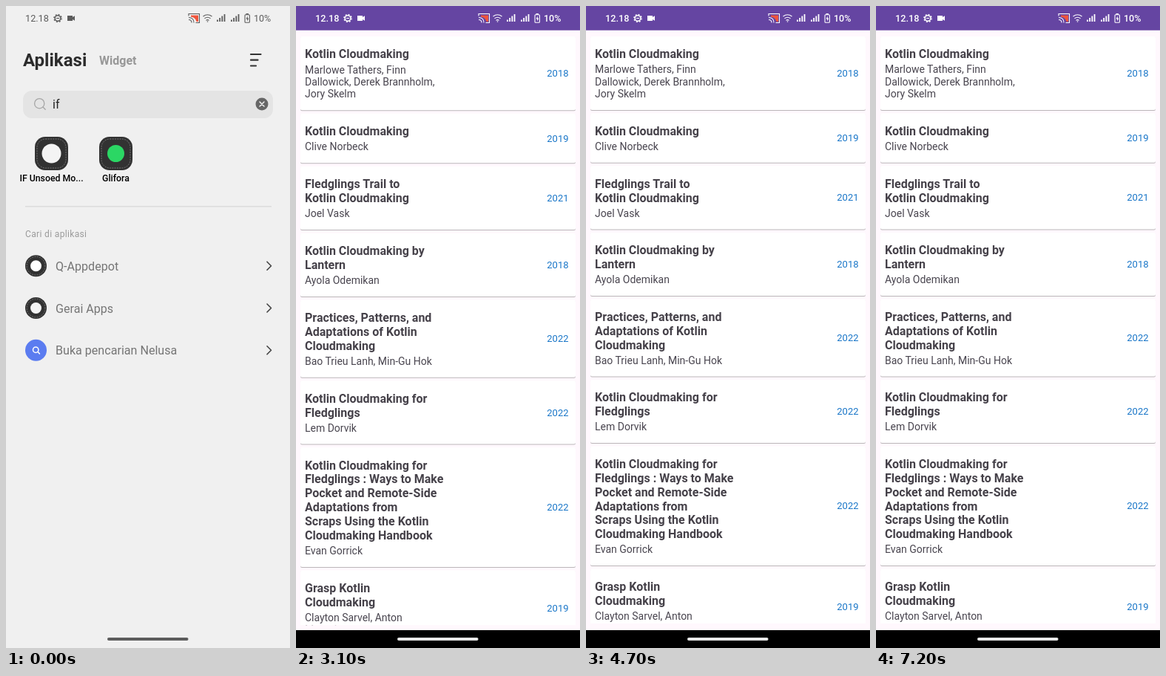
Animation, 384 px wide and 864 px high, one loop 7300 ms. Source, as an HTML page:

```html
<!DOCTYPE html>
<html lang="id">
<head>
<meta charset="utf-8">
<title>Book list app</title>
<style>
  html, body { margin: 0; width: 100%; height: 100%; overflow: hidden; background: #f0f0f0; }
  svg { display: block; width: 100%; height: 100%; }
  text { font-family: Roboto, sans-serif; }
  .label { font-size: 12.3px; font-weight: 500; text-anchor: middle; }
  .row { font-size: 16.1px; fill: #757575; }
  .title { font-size: 16px; font-weight: 700; fill: #454149; }
  .author { font-size: 14px; fill: #49454f; }
  .year { font-size: 13px; fill: #1976c8; text-anchor: end; }
  .card { fill: #fff; filter: drop-shadow(0 1px .6px #0004); }
  .line { fill: none; stroke-linecap: round; stroke-linejoin: round; }
  .dash { fill: none; stroke: #8a8a8a; stroke-width: .8; stroke-dasharray: 1.8 1.5; }
</style>
</head>
<body>
<svg viewBox="0 0 384 864">
  <defs>
    <clipPath id="windowClip"><rect id="windowRect"/></clipPath>
    <clipPath id="listClip"><rect y="40" width="384" height="791"/></clipPath>
  </defs>

  <g id="launcher">
    <rect width="384" height="864" fill="#f0f0f0"/>
    <text x="23" y="81" font-size="24" font-weight="700" fill="#2c2c2c">Aplikasi</text>
    <text x="126" y="78.5" font-size="16" font-weight="700" fill="#979797">Widget</text>
    <path class="line" d="M331 65h13.5M331 72.7h9.5M331 80.5h7" stroke="#333" stroke-width="2.2"/>
    <rect x="23" y="114" width="338" height="37" rx="12" fill="#e4e4e4"/>
    <g class="line" stroke="#a6a6a6" stroke-width="1.3"><circle cx="45.2" cy="131.2" r="6.6"/><path d="M50 136l3.2 3.2"/></g>
    <text x="63" y="138" font-size="16" fill="#222">if</text>
    <rect id="caret" x="74" y="123.5" width="1.6" height="19" fill="#456fff"/>
    <circle cx="346" cy="132" r="8.5" fill="#666"/>
    <path class="line" d="M343 129l6 6m0-6l-6 6" stroke="#f0f0f0" stroke-width="1.5"/>
    <g id="apps"></g>
    <path d="M26 269.8H359" stroke="#dcdcdc" stroke-width="1.5"/>
    <text x="26" y="310.5" font-size="12" letter-spacing=".35" fill="#9a9a9a">Cari di aplikasi</text>
    <g id="rows"></g>
  </g>

  <g id="window" clip-path="url(#windowClip)">
    <g id="screen">
      <rect width="384" height="864" fill="#fff8fd"/>
      <rect width="384" height="32.7" fill="#6545a2"/>
      <g id="stretch" clip-path="url(#listClip)"><g id="list"></g></g>
      <rect y="840" width="384" height="24"/>
    </g>
  </g>

  <g id="status" fill="currentColor">
    <text x="26" y="21.3" font-size="12.7">12.18</text>
    <g fill="none" stroke="currentColor">
      <circle cx="70" cy="16.5" r="3.8" stroke-width="1.5"/>
      <circle cx="70" cy="16.5" r="5.1" stroke-width="1.4" stroke-dasharray="2 2"/>
      <path d="M68 16.5h4" stroke-width="1.2"/>
    </g>
    <path d="M83 13h7v2l3-1.7v6.4l-3-1.7v2h-7z"/>
    <path d="M250 12.5h10v8.5h-2.500q-1.500-6-7.500-6.500z" fill="#f0553c"/>
    <g fill="none" stroke="currentColor" stroke-width="1.1">
      <path d="M247 13.5v-3h14.5v12h-5M247 15.5q7 0 7 7M247 18.5q4 0 4 4"/>
      <path d="M266.5 14q6-4.500 12 0M268.5 16.8q4-3 8 0M270.5 19.4q2-1.500 4 0"/>
      <rect x="323" y="11.8" width="6.4" height="10.4" rx="1"/>
    </g>
    <circle cx="272.5" cy="21" r=".8"/>
    <path d="M324.5 10h3.4v1.5h-3.4zM326.7 13.5l-2.2 4h1.6v3l2.2-4h-1.6z"/>
    <g id="signals"></g>
    <text x="335" y="21.3" font-size="12.5">10%</text>
  </g>
  <rect id="pill" x="137" y="850" width="109.5" height="4" rx="2"/>
</svg>

<script>
const LOOP = 7300, STEP = 100, MAX_SCROLL = 173;
const $ = id => document.getElementById(id);
const text = (cls, x, y, s) => `<text class="${cls}" x="${x}" y="${y}">${s}</text>`;

const books = [
  ["Kotlin Cloudmaking", "Marlowe Tathers, Finn|Dallowick, Derek Brannholm,|Jory Skelm", 2018],
  ["Kotlin Cloudmaking", "Clive Norbeck", 2019],
  ["Fledglings Trail to|Kotlin Cloudmaking", "Joel Vask", 2021],
  ["Kotlin Cloudmaking by|Lantern", "Ayola Odemikan", 2018],
  ["Practices, Patterns, and|Adaptations of Kotlin|Cloudmaking", "Bao Trieu Lanh, Min-Gu Hok", 2022],
  ["Kotlin Cloudmaking for|Fledglings", "Lem Dorvik", 2022],
  ["Kotlin Cloudmaking for|Fledglings : Ways to Make|Pocket and Remote-Side|Adaptations from|Scraps Using the Kotlin|Cloudmaking Handbook", "Evan Gorrick", 2022],
  ["Grasp Kotlin|Cloudmaking", "Clayton Sarvel, Anton|Mocariu", 2019],
  ["Kotlin Sparks", "Samil Rahmoud", 2019],
  ["Unfolding Kotlin", "Kurt Osel", 2019]
];

function buildList() {
  const TITLE_LINE = 18.85, AUTHOR_LINE = 16.4;
  let top = 41, out = "";
  for (const [title, author, year] of books) {
    const titles = title.split("|"), authors = author.split("|");
    const height = 31 + titles.length * TITLE_LINE + authors.length * AUTHOR_LINE;
    const baseline = top + 29.4;
    const authorBase = baseline + (titles.length - 1) * TITLE_LINE + 20;
    out += `<rect class="card" x="6" y="${top}" width="372" height="${height}" rx="2"/>`;
    titles.forEach((s, i) => out += text("title", 12, baseline + i * TITLE_LINE, s));
    authors.forEach((s, i) => out += text("author", 12, authorBase + i * AUTHOR_LINE, s));
    out += text("year", 368.5, top + height / 2 + 4.6, year);
    top += height + 4.5;
  }
  $("list").innerHTML = out;
}

function buildLauncher() {
  $("apps").innerHTML = [["IF Unsoed Mo...", 61.5, "#f4f4f4", 13], ["Glifora", 148.5, "#2bd764", 11.5]]
    .map(([name, x, color, r]) =>
      `<rect x="${x - 22.5}" y="176" width="45" height="45" rx="14" fill="#323232"/>
       <rect class="dash" x="${x - 19.5}" y="179" width="39" height="39" rx="11.5"/>
       <circle cx="${x}" cy="198.5" r="${r}" fill="${color}"/>` + text("label", x, 236, name)).join("");

  $("rows").innerHTML = [["Q-Appdepot", "#323232", "#fff"], ["Gerai Apps", "#323232", "#f4f4f4"], ["Buka pencarian Nelusa", "#5b7cf0"]]
    .map(([name, color, mark], i) => {
      const y = 349.7 + i * 56.8;
      const inner = mark
        ? `<circle class="dash" cx="40.5" cy="${y}" r="12.4"/><circle cx="40.5" cy="${y}" r="7.5" fill="${mark}"/>`
        : `<g class="line" stroke="#fff" stroke-width="1.5"><circle cx="40.2" cy="${y - .6}" r="3.7"/><path d="M43 ${y + 2.2}l2.4 2.4"/></g>`;
      return `<circle cx="40.5" cy="${y}" r="14.5" fill="${color}"/>${inner}` + text("row", 67, y + 6, name) +
        `<path class="line" d="M353 ${y - 5.5}l5.5 5.5-5.5 5.5" stroke="#444" stroke-width="1.6"/>`;
    }).join("");

  $("signals").innerHTML = [285, 304].map(x => [0, 1, 2, 3].map(i =>
    `<rect x="${x + i * 3.2}" y="${18.5 - i * 2.5}" width="1.8" height="${2.5 + i * 2.5}"/>`).join("")).join("");
}

const progress = (t, a, b) => Math.min(1, Math.max(0, (t - a) / (b - a)));
const easeOut = (t, a, b) => 1 - (1 - progress(t, a, b)) ** 3;
const mix = (a, b, p) => a + (b - a) * p;

// Quick pull and slow release, peaking at 1 after a third of the span.
function bump(t, a, b) {
  const p = progress(t, a, b);
  return 6.75 * p * (1 - p) ** 2;
}

function drawWindow(t) {
  const open = easeOut(t, 950, 1550);
  const x = mix(39, 0, open), y = mix(176, 0, open);
  const width = mix(45, 384, open), height = mix(45, 864, open);
  const box = { x, y, width, height, rx: mix(14, 0, open) };
  for (const key in box) $("windowRect").setAttribute(key, box[key]);
  $("window").style.display = open > 0 ? "" : "none";
  $("window").style.opacity = progress(t, 900, 1100);
  $("screen").setAttribute("transform", `translate(${x} ${y}) scale(${width / 384} ${height / 864})`);
  $("list").style.opacity = progress(t, 1300, 1700);

  const inApp = open > .8;
  $("status").style.color = inApp ? "#fff" : "#5c5c5c";
  $("status").style.fontWeight = inApp ? 500 : 400;
  $("pill").setAttribute("fill", inApp ? "#e8e8e8" : "#5c5c5c");
}

function drawList(t) {
  const scroll = MAX_SCROLL * (easeOut(t, 3200, 3630) - easeOut(t, 3900, 4330)
    + easeOut(t, 5800, 6238) - easeOut(t, 6700, 7200));
  const pullTop = .03 * bump(t, 2400, 3200) + .012 * bump(t, 4200, 4700);
  const pullBottom = .012 * bump(t, 6050, 6500);
  const pivot = pullBottom ? 832 : 40;
  $("list").setAttribute("transform", `translate(0 ${-scroll})`);
  $("stretch").setAttribute("transform",
    `translate(0 ${pivot}) scale(1 ${1 + pullTop + pullBottom}) translate(0 ${-pivot})`);
}

function frame() {
  const t = Math.floor((performance.now() - start) % LOOP / STEP) * STEP;
  $("caret").style.opacity = t < 300 || t >= 800 ? 0 : t < 700 ? 1 : .4;
  drawWindow(t);
  drawList(t);
  requestAnimationFrame(frame);
}

buildList();
buildLauncher();
const start = performance.now();
frame();
</script>
</body>
</html>
```
